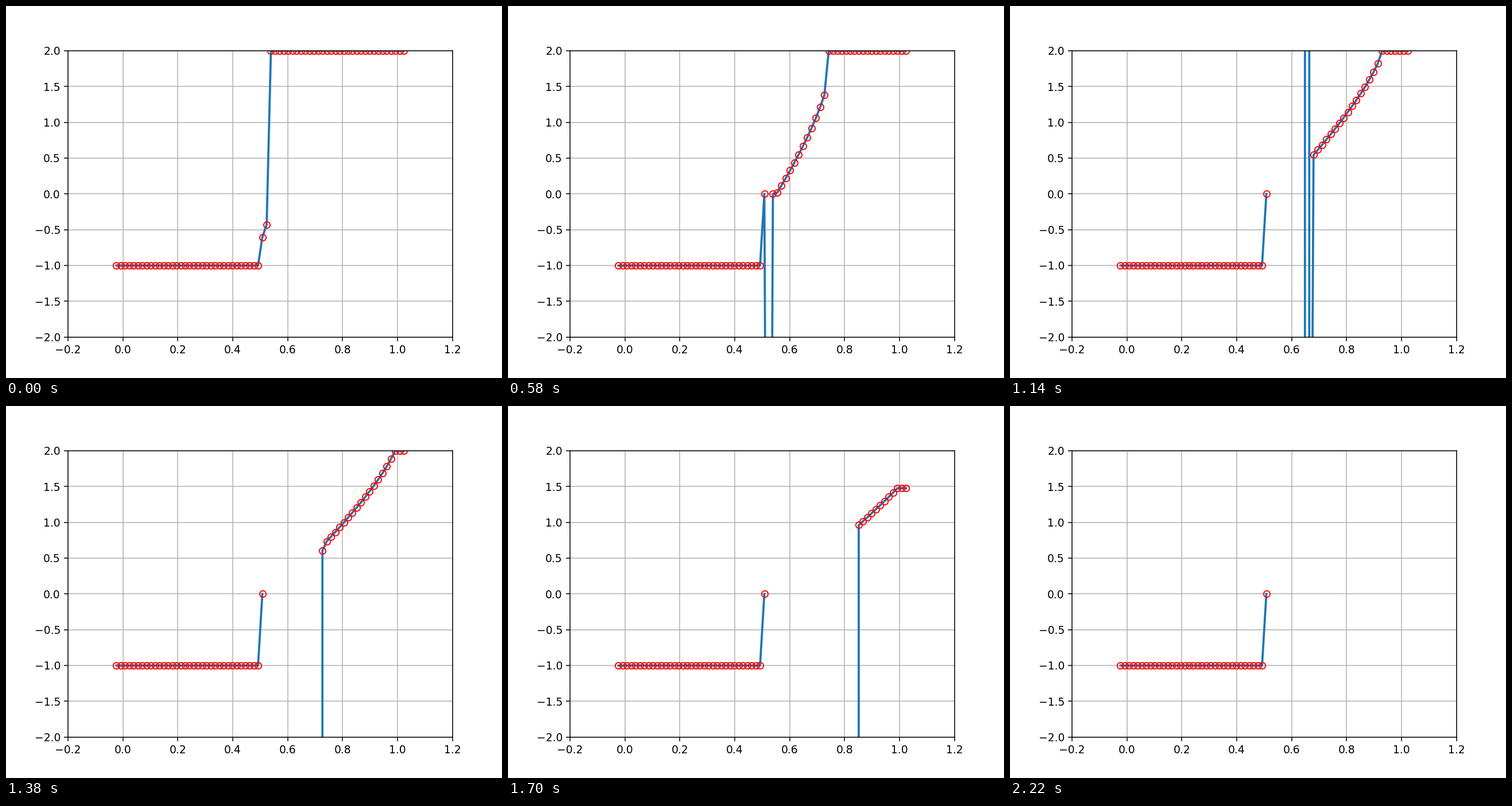
Write a matplotlib script that moves like this. It is 864 by 648 pixels and loops after 5.68 s.

```python
import numpy as np
import matplotlib.pyplot as plt
from matplotlib.animation import FuncAnimation

CELLS, GHOST = 64, 2
DX = 1 / CELLS
U_LEFT, U_RIGHT = -1.0, 2.0
DT = 0.9 * DX / U_RIGHT
STEPS = 60
TICK, LOOP = 20, 5680  # ms

x = (np.arange(-GHOST, CELLS + GHOST) + 0.5) * DX


def advance(u):
    """One non-conservative upwind step of Burgers' equation."""
    new = u.copy()
    inner = slice(GHOST, -GHOST)
    left = u[GHOST - 1:-GHOST - 1]
    new[inner] = u[inner] - DT / DX * u[inner] * (u[inner] - left)
    new[:GHOST] = new[GHOST]
    new[-GHOST:] = new[-GHOST - 1]
    return new


def solve():
    u = np.where(x < 0.5, U_LEFT, U_RIGHT)
    states = []
    with np.errstate(all="ignore"):
        for _ in range(STEPS + 2):
            u = advance(u)
            states.append(u)
    return states[1:]  # display starts after the second step


def step_at(ms):
    """Steps are held for 20, 100 and 20 ms in turn."""
    cycle, rest = divmod(ms, 140)
    return min(3 * cycle + (rest >= 20) + (rest >= 120), STEPS)


states = solve()

fig, ax = plt.subplots(figsize=(6.4, 4.8), dpi=135)
ax.set_xlim(-0.2, 1.2)
ax.set_ylim(-2, 2)
ax.grid(True)
line, = ax.plot(x, states[0], color="tab:blue", lw=2)
dots, = ax.plot(x, states[0], "ro", mfc="none")


def update(i):
    u = states[step_at(i * TICK)]
    line.set_ydata(u)
    dots.set_ydata(u)
    return line, dots


anim = FuncAnimation(fig, update, frames=LOOP // TICK, interval=TICK,
                     init_func=lambda: update(0), repeat=True, repeat_delay=0)
plt.show()
```
